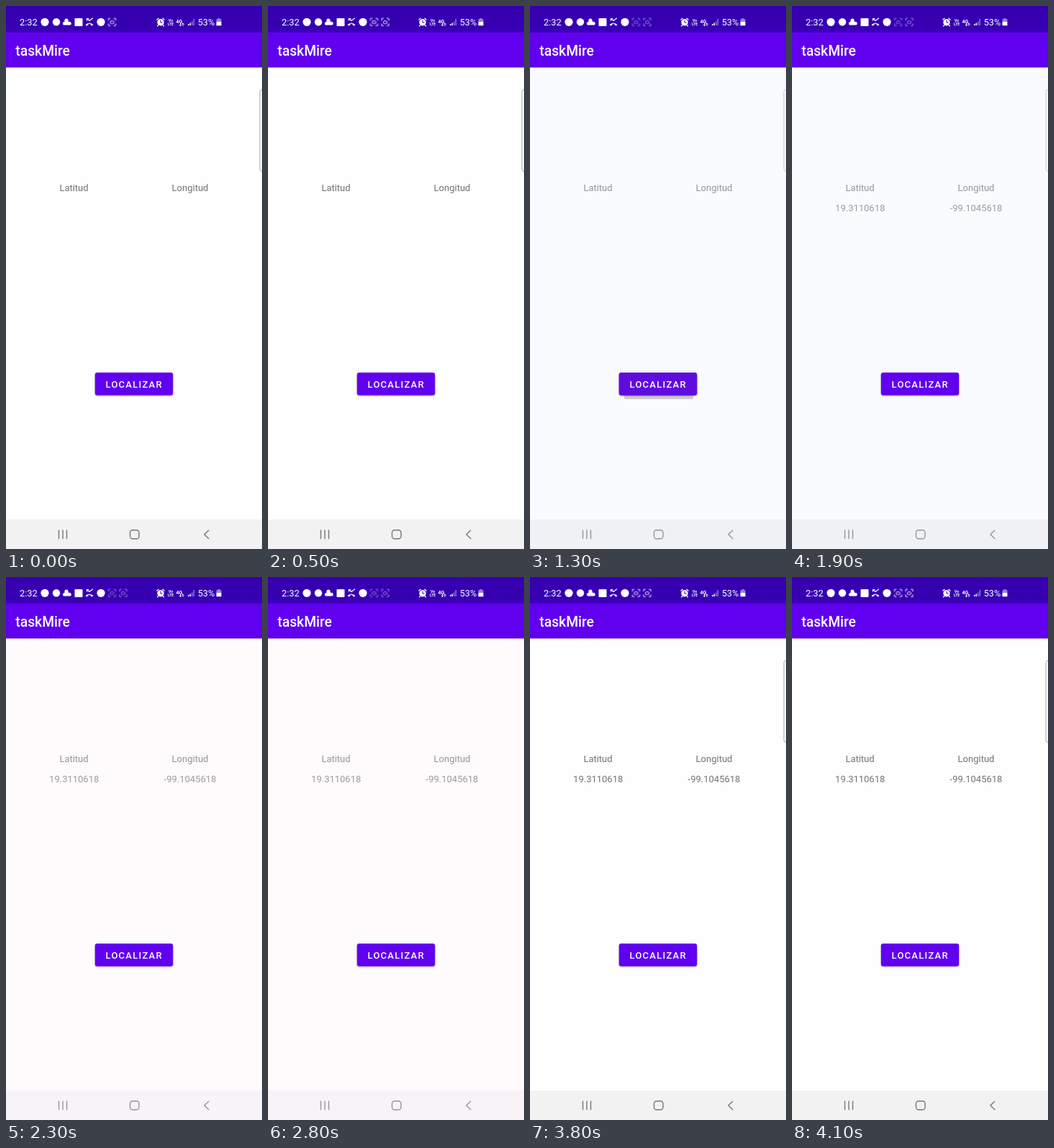
Animation of 356 by 754 pixels, one loop 4200 ms. Source, as an HTML page:

```html
<!DOCTYPE html>
<html lang="es">
<head>
<meta charset="utf-8">
<title>taskMire</title>
<style>
  html, body { margin: 0; width: 100%; height: 100%; overflow: hidden; background: #fff; }
  svg { display: block; width: 356px; height: 754px; font-family: Roboto, sans-serif; }
  .anim { animation: 4200ms step-end infinite; }
  .page { fill: #fefefe; animation-name: page; }
  .nav { fill: #f2f2f2; animation-name: nav; }
  .soft { animation-name: soft; }
  .values { animation-name: values; }
  .edge { animation-name: edge; }
  .press { animation-name: press; }
  .first { animation-name: first; }
  .second { animation-name: second; }
  .label { font-size: 13px; fill: #737373; text-anchor: middle; }
  .line { fill: none; stroke-linecap: round; stroke-linejoin: round; }
  .raised { filter: drop-shadow(0 1px 1.1px rgba(0, 0, 0, .35)); }

  @keyframes page {
    0%, 90.48% { fill: #fefefe; }
    28.57% { fill: #fafbff; }
    52.38% { fill: #fffafc; }
  }
  @keyframes nav {
    0%, 90.48% { fill: #f2f2f2; }
    28.57% { fill: #f0f1f5; }
    52.38% { fill: #f7f3f6; }
  }
  @keyframes soft {
    0%, 69.05% { opacity: 1; }
    28.57% { opacity: .75; }
  }
  @keyframes values {
    0% { opacity: 0; }
    33.33% { opacity: .7; }
    69.05% { opacity: 1; }
  }
  @keyframes edge {
    0%, 69.05% { opacity: 1; }
    28.57% { opacity: .6; }
    52.38% { opacity: 0; }
  }
  @keyframes press {
    0%, 35.71% { opacity: 0; }
    28.57% { opacity: 1; }
  }
  @keyframes first {
    0%, 90.48% { opacity: .9; }
    23.81% { opacity: .45; }
  }
  @keyframes second {
    0% { opacity: 0; }
    7.14%, 69.05% { opacity: .9; }
    28.57% { opacity: .5; }
  }
</style>
</head>
<body>
<svg viewBox="0 0 356 754">
  <defs>
    <g id="capture" class="line" stroke="#fff" stroke-width="1">
      <path d="M-5-2.5V-5H-2.5M2.5-5H5V-2.5M5 2.5V5H2.5M-2.5 5H-5V2.5"/>
      <rect x="-2.5" y="-1.5" width="5" height="3.5" rx="1"/>
    </g>
    <linearGradient id="bar" x2="0" y2="1">
      <stop offset=".75" stop-color="#3600b1"/>
      <stop offset="1" stop-color="#3c00bb"/>
    </linearGradient>
  </defs>

  <rect class="anim page" width="356" height="754"/>
  <rect y="36" width="356" height="49.4" fill="#6000ee"/>
  <rect width="356" height="36.7" fill="url(#bar)"/>
  <text x="13.3" y="68.5" font-size="19.3" font-weight="500" fill="#fff">taskMire</text>

  <!-- status bar -->
  <g fill="#fff">
    <text x="19" y="27.3" font-size="12.8">2:32</text>
    <circle cx="54" cy="22.3" r="5.6"/>
    <circle cx="70" cy="22.3" r="5.2"/>
    <circle cx="84" cy="20" r="2.6"/>
    <path d="M80 26.5a2.5 2.5 0 0 1 1-4.6 4 4 0 0 1 6.6 0 2.4 2.4 0 0 1 1.4 4.6z"/>
    <rect x="95.5" y="17" width="11" height="11" rx="1"/>
    <path class="line" stroke="#fff" stroke-width="1.2" d="M112.5 17.5l3.5 3 4.5-3.5M112.5 20v-2.5h2.5"/>
    <path d="M110.5 26q5.5-5 11 0l-1.8 1.6-2.2-1.6v-1.2h-3v1.2l-2.2 1.6z"/>
    <circle cx="132" cy="22.3" r="5.6"/>
    <use href="#capture" x="147.5" y="22.3" class="anim first"/>
    <use href="#capture" x="163" y="22.3" class="anim second"/>

    <circle cx="215" cy="22.8" r="4.7"/>
    <path class="line" stroke="#fff" stroke-width="1.4" d="M210 19l2-1.8M220 19l-2-1.8M211.6 26.8l-1 1M218.4 26.8l1 1"/>
    <path class="line" stroke="#3600b1" d="M215 20v3h2.3"/>
    <g font-size="5" font-weight="700" text-anchor="middle">
      <text x="229" y="21.8">Vo</text>
      <text x="229" y="26.5">LTE</text>
      <text x="241" y="23.5" font-size="7">4G</text>
    </g>
    <path class="line" stroke="#fff" stroke-width=".9" d="M242.5 24v3.5l-1.3-1.3M242.5 27.5l1.3-1.3M246 27.5V24l-1.3 1.3M246 24l1.3 1.3"/>
    <path d="M253 27v-2h1.5v2zM255.5 27v-3.5h1.5v3.5z"/>
    <path opacity=".45" d="M258 27v-5.5h1.5v5.5zM260.5 27v-9h1.5v9z"/>
    <text x="266.8" y="27.3" font-size="12.6">53%</text>
    <path d="M292.5 22h7v5.2h-7z"/>
    <path opacity=".5" d="M292.5 22v-3.7h2v-1.3h3v1.3h2v3.7z"/>
  </g>

  <rect class="anim edge" x="353" y="115.5" width="12" height="114.5" rx="4" fill="#f8f8f8" stroke="#aaa"/>

  <g class="label">
    <g class="anim soft">
      <text x="94.5" y="256.8">Latitud</text>
      <text x="256" y="256.8">Longitud</text>
    </g>
    <g class="anim values">
      <text x="94.7" y="285.3">19.3110618</text>
      <text x="256" y="285.3">-99.1045618</text>
    </g>
  </g>

  <!-- button -->
  <rect class="anim press" x="131" y="540" width="96" height="6" rx="2" fill="#d3cbd2"/>
  <rect class="raised" x="123.8" y="509" width="108.4" height="31.4" rx="3.2" fill="#6000ee"/>
  <rect class="anim press" x="123.8" y="509" width="108.4" height="31.4" rx="3.2" fill="#600cdf"/>
  <text x="138.5" y="530" font-size="13" font-weight="500" letter-spacing="1.25" fill="#fff">LOCALIZAR</text>

  <!-- navigation -->
  <rect class="anim nav" y="713" width="356" height="41"/>
  <g class="anim soft">
    <g class="line" stroke="#777" stroke-width="1.4">
      <path d="M73.5 728v11.5M79 728v11.5M84.5 728v11.5"/>
      <rect x="172.5" y="727.8" width="12.5" height="12" rx="3.5"/>
      <path d="M281.8 728.2l-6 5.6 6 5.6"/>
    </g>
  </g>
</svg>
</body>
</html>
```
